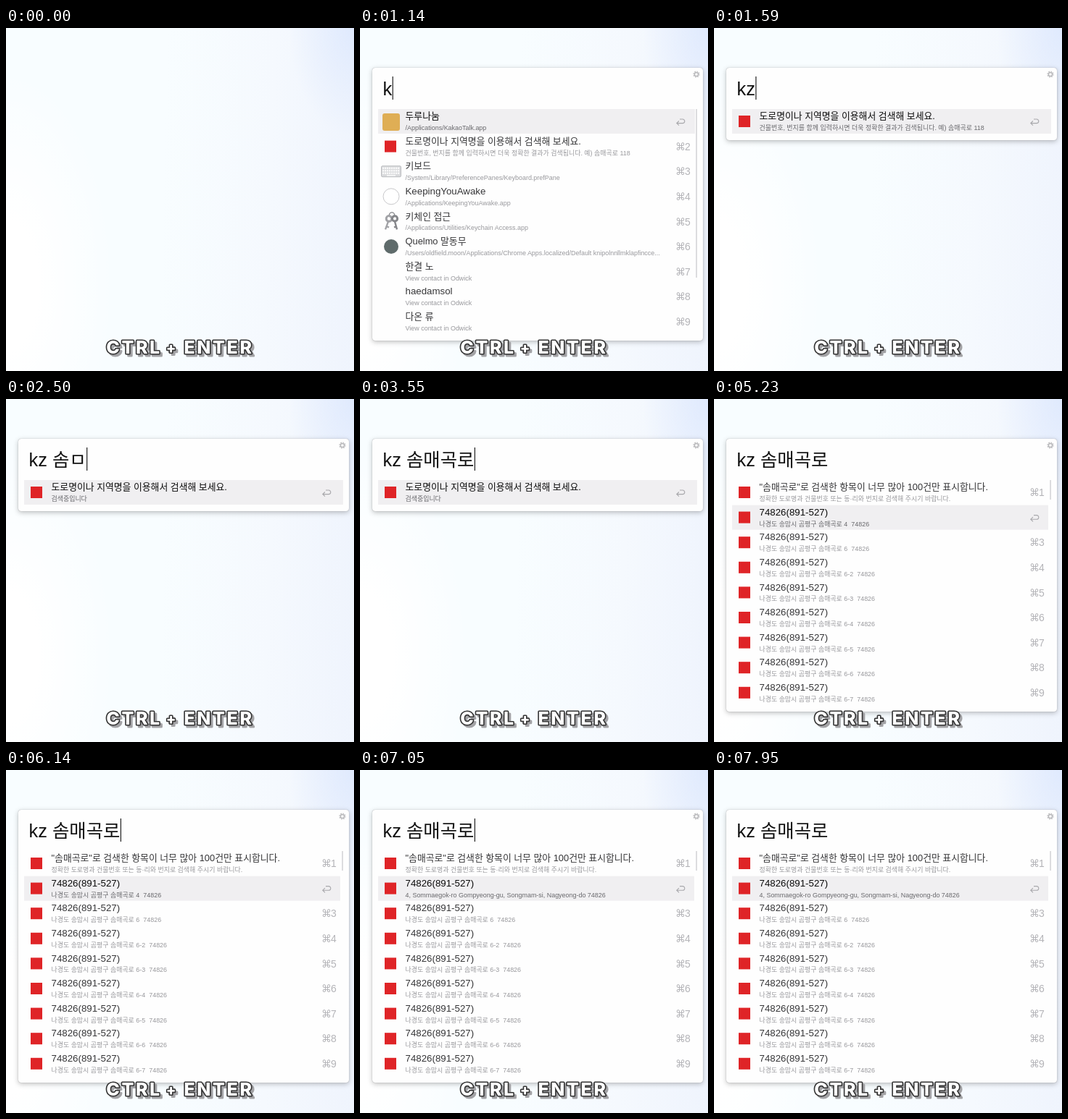
An HTML page that plays this animation: 480x474 px, repeating every 8000 ms.

```html
<!DOCTYPE html>
<html lang="ko">
<head>
<meta charset="utf-8">
<title>Launcher address search</title>
<style>
html, body { margin: 0; width: 100%; height: 100%; overflow: hidden; }
body {
  position: relative;
  background:
    radial-gradient(ellipse 90px 150px at 100% 0, rgba(218, 230, 253, .75), rgba(218, 230, 253, 0)),
    radial-gradient(ellipse 150px 300px at 0 75%, #fff 30%, rgba(255, 255, 255, 0)),
    linear-gradient(92deg, #f8fdff 0, #f8fdff 45%, #f5f9fe 75%, #eff4fd 100%);
}
#panel {
  position: absolute; left: 17px; top: 55px; width: 456px;
  border-radius: 4px; background: #fefefe;
  box-shadow: 0 0 1px rgba(0, 0, 0, .4), 0 2px 7px rgba(0, 0, 0, .25);
}
svg { position: absolute; left: 0; top: 0; }
text { font-family: "Liberation Sans", "Noto Sans CJK KR", "Noto Sans CJK", sans-serif; white-space: pre; }
#query { font-size: 25.4px; font-weight: 300; fill: #111; }
.title { font-size: 12.85px; fill: #363638; }
.title.latin { font-size: 13.3px; }
.sub { font-size: 8.95px; fill: #98989c; }
.key { font-size: 14px; fill: #b4b4b8; }
.cmd { font-family: "DejaVu Sans", sans-serif; }
.bar { fill: none; }
.arrow { display: none; fill: none; stroke: #a8a8ac; stroke-width: 1.1; }
.on .bar { fill: #f0eff1; }
.on .title { fill: #0c0c0c; }
.on .sub { fill: #68686c; }
.on .arrow { display: inline; }
.on .key { display: none; }
.caption text {
  font-family: Inter, "Open Sans", sans-serif; font-weight: 800; font-size: 25px;
  letter-spacing: 2.6px; text-anchor: middle; paint-order: stroke;
  stroke-width: 3.2px; stroke-linejoin: round;
}
.caption .plus { font-size: 20px; letter-spacing: 0; }
.shade text { fill: #a3a3a6; stroke: #a3a3a6; }
.face text { fill: #fff; stroke: #333; }
</style>
</head>
<body>
<div id="panel"></div>
<svg width="480" height="474" viewBox="0 0 480 474">
  <defs>
    <g id="app"><rect x="31" y="6" width="24" height="24" rx="3" fill="#dfae55"/></g>
    <g id="post"><rect x="34" y="9" width="16" height="16" fill="#df2427"/></g>
    <g id="awake"><circle cx="43" cy="17" r="11" fill="#fff" stroke="#c9c9cb"/></g>
    <g id="chat"><circle cx="43" cy="17" r="10" fill="#5f6b6b"/></g>
    <g id="keyboard">
      <rect x="29.5" y="9.5" width="27" height="15" rx="1.5" fill="#d9dadc" stroke="#bcbdc0"/>
      <path d="M31 12.5h24M31 16h24M31 19.5h24" stroke="#f8f8f8" stroke-width="2.4" stroke-dasharray="2.2 .8"/>
      <path d="M37 22.6h12" stroke="#f8f8f8" stroke-width="1.6"/>
    </g>
    <g id="keys" fill="none" stroke="#85868a">
      <circle cx="44" cy="8" r="3.6" stroke-width="1.3"/>
      <circle cx="40" cy="13" r="3.8" stroke-width="3" stroke="#a2a3a7"/>
      <circle cx="48" cy="13" r="3.6" stroke-width="3"/>
      <path d="M39 17L35 28M37 24l3 1" stroke-width="2.4" stroke="#a2a3a7"/>
      <path d="M48 17l3 11M50 24l-3 1" stroke-width="2.4"/>
    </g>
  </defs>
  <g id="ui">
    <g fill="none" stroke="#b8b8bb">
      <circle cx="464" cy="64" r="2.6" stroke-width="1.5"/>
      <circle cx="464" cy="64" r="4" stroke-width="1.2" stroke-dasharray="1.6 1.54"/>
    </g>
    <text id="query" x="31.5" y="93"></text>
    <rect id="caret" y="67" width="1.2" height="32" fill="#222"/>
    <rect id="scroll" x="463.3" y="112" width="1.6" fill="#d4d4d8"/>
    <g id="lists"></g>
  </g>
  <g class="caption">
    <g class="shade" transform="translate(3 3)"></g>
    <g class="face"></g>
  </g>
</svg>
<script>
const LOOP = 8000, PITCH = 34.6, TOP = 112;
const $ = id => document.getElementById(id);

const road = '솜매곡로', code = '74826';
const ask = '도로명이나 지역명을 이용해서 검색해 보세요.';
const hint = `건물번호, 번지를 함께 입력하시면 더욱 정확한 결과가 검색됩니다. 예) ${road} 118`;
const contact = 'View contact in Odwick';
const korean = no => `나경도 송맘시 곰평구 ${road} ${no}  ${code}`;
const english = `4, Sommaegok-ro Gompyeong-gu, Songmam-si, Nagyeong-do ${code}`;
const numbers = ['4', '6', '6-2', '6-3', '6-4', '6-5', '6-6', '6-7'];

const scenes = {
  apps: { width: 437, scroll: 233, rows: [
    ['app', '두루나눔', '/Applications/KakaoTalk.app'],
    ['post', ask, hint],
    ['keyboard', '키보드', '/System/Library/PreferencePanes/Keyboard.prefPane'],
    ['awake', 'KeepingYouAwake', '/Applications/KeepingYouAwake.app'],
    ['keys', '키체인 접근', '/Applications/Utilities/Keychain Access.app'],
    ['chat', 'Quelmo 말동무', '/Users/oldfield.moon/Applications/Chrome Apps.localized/Default knipolnnllmklapfincce...'],
    ['', '한결 노', contact],
    ['', 'haedamsol', contact],
    ['', '다온 류', contact]
  ] },
  wait: { width: 440, scroll: 0, rows: [['post', ask, hint]] },
  found: { width: 436, scroll: 27, rows: [
    ['post', `"${road}"로 검색한 항목이 너무 많아 100건만 표시합니다.`,
      '정확한 도로명과 건물번호 또는 동·리와 번지로 검색해 주시기 바랍니다.'],
    ...numbers.map(no => ['post', code + '(891-527)', korean(no)])
  ] }
};

function rowMarkup([icon, title, sub], i, width) {
  const latin = /^[\x20-\x7e]+$/.test(title) ? ' latin' : '';
  return `<g class="row" transform="translate(0 ${TOP + i * PITCH})">
    <rect class="bar" x="25" width="${width}" height="34"/>
    ${icon && `<use href="#${icon}"/>`}
    <text class="title${latin}" x="62.5" y="14.3">${title}</text>
    <text class="sub" x="62.5" y="29">${sub}</text>
    <text class="key cmd" x="435" y="22.3">⌘</text>
    <text class="key" x="448" y="22.3">${i + 1}</text>
    <path class="arrow" d="M441 14h4a2.6 2.6 0 0 1 0 5.6h-8M440 16.5l-3.2 3.1 3.2 3.1"/>
  </g>`;
}

$('lists').innerHTML = Object.entries(scenes).map(([name, { rows, width }]) =>
  `<g id="${name}">${rows.map((row, i) => rowMarkup(row, i, width)).join('')}</g>`).join('');

for (const part of ['.shade', '.face'])
  document.querySelector(part).innerHTML = `
    <text x="176.5" y="449.5">CTRL</text>
    <text class="plus" x="227.5" y="448.5">+</text>
    <text x="293.5" y="449.5">ENTER</text>`;

const typing = [
  [0, ''], [1140, 'k'], [1400, 'kz'], [1600, 'kz '],
  [1950, 'kz ㅅ'], [2040, 'kz 소'], [2130, 'kz 솜'],
  [2400, 'kz 솜ㅁ'], [2600, 'kz 솜매'],
  [2760, 'kz 솜맥'], [2890, 'kz 솜매고'], [3020, 'kz 솜매곡'],
  [3230, 'kz 솜매곡ㄹ'], [3420, 'kz 솜매곡로']
];
const stages = [[0, ''], [1140, 'apps'], [1400, 'wait'], [4410, 'found']];
const heights = { '': 59, apps: 377, wait: 100, found: 377 };

const at = (steps, t) => steps.filter(([start]) => start <= t).pop()[1];
const clamp = v => Math.max(0, Math.min(1, v));

// The caret stays lit while typing, then blinks with short fades.
function caretAlpha(t) {
  if (t < 4030) return 1;
  const p = (t - 4030) % 1120;
  return p < 600 ? 1 - clamp(p / 70) : clamp((p - 600) / 70);
}

const setText = (el, s) => { if (el.textContent !== s) el.textContent = s; };
const sub = (name, i) => $(name).querySelectorAll('.sub')[i];

function draw(t) {
  const stage = at(stages, t);
  $('ui').style.opacity = $('panel').style.opacity = clamp((t - 680) / 220);
  $('panel').style.height = heights[stage] + 'px';

  setText($('query'), at(typing, t));
  $('caret').setAttribute('x', 31.9 + $('query').getComputedTextLength());
  $('caret').style.opacity = caretAlpha(t);

  for (const name in scenes) $(name).style.display = name === stage ? '' : 'none';
  $('scroll').setAttribute('height', stage ? scenes[stage].scroll : 0);

  const picked = t < 4900 ? 0 : 1;
  if (stage) $(stage).querySelectorAll('.row').forEach((row, i) =>
    row.classList.toggle('on', i === picked * (stage === 'found')));
  setText(sub('wait', 0), t < 1650 ? hint : '검색중입니다');
  setText(sub('found', 1), t < 6400 ? korean('4') : english);
}

function tick() {
  draw(performance.now() % LOOP);
  requestAnimationFrame(tick);
}
tick();
</script>
</body>
</html>
```
